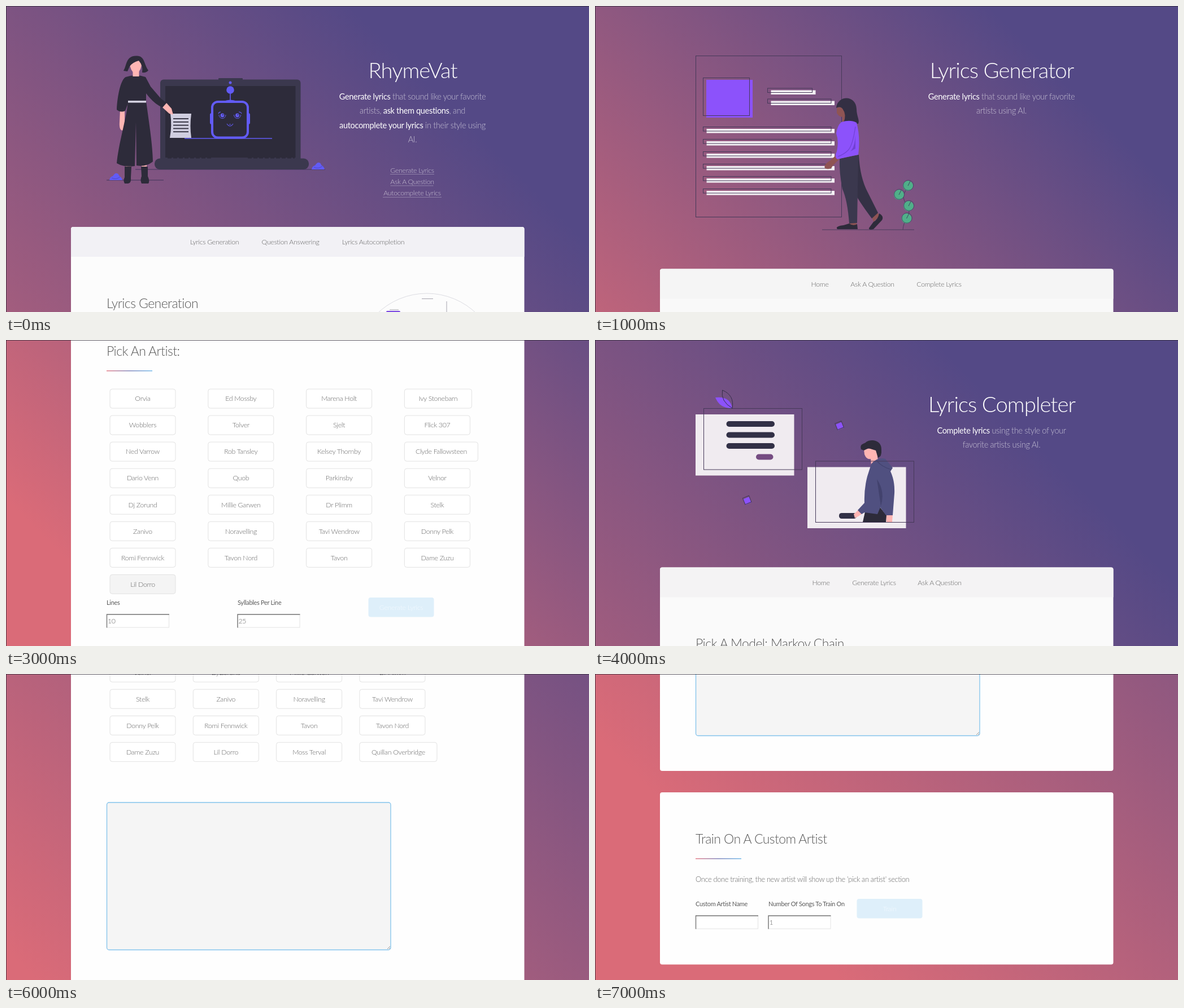
Recreate the animation shown at these times as an HTML page. Size 1032x543 px, loop 8000 ms.

```html
<!DOCTYPE html>
<html lang="en">
<head>
<meta charset="utf-8">
<style>
  html, body { margin: 0; width: 100%; height: 100%; overflow: hidden; }
  svg { display: block; width: 1032px; height: 543px; font-family: Lato, "Open Sans", sans-serif; }
  text { letter-spacing: -.025em; }
  .card { fill: var(--card); }
  .thin { fill: none; stroke: #463959; }
</style>
</head>
<body>
<svg id="stage" viewBox="0 0 1032 543"></svg>
<script>
const DARK = '#2d2b3a', SLATE = '#3b384e', BLUE = '#625bf6', VIOLET = '#8c52fb', SKIN = '#ffb5b3', BROWN = '#8f5454';
const GREY = '#646464', SOFT = 'rgba(255,255,255,.65)';

const rect = (x, y, w, h, fill, r = 0, more = '') =>
  `<rect x="${x}" y="${y}" width="${w}" height="${h}" rx="${r}" fill="${fill}" ${more}/>`;
const frame = (x, y, w, h) => `<rect class="thin" x="${x}" y="${y}" width="${w}" height="${h}"/>`;
const circle = (x, y, r, fill, more = '') => `<circle cx="${x}" cy="${y}" r="${r}" fill="${fill}" ${more}/>`;
const shape = (d, fill) => `<path d="${d}" fill="${fill}"/>`;
const line = (d, stroke, w = 1, more = '') => `<path d="${d}" fill="none" stroke="${stroke}" stroke-width="${w}" ${more}/>`;
const text = (x, y, s, size, fill = GREY, anchor = 'start', weight = 300) =>
  `<text x="${x}" y="${y}" font-size="${size}" fill="${fill}" text-anchor="${anchor}" font-weight="${weight}">${s}</text>`;
const strong = s => `<tspan font-weight="400" fill="#fff">${s}</tspan>`;
const at = (y, body) => `<g transform="translate(0 ${y})">${body}</g>`;
const repeat = (n, draw) => Array.from({ length: n }, (_, i) => draw(i)).join('');

// Diagonal page backdrop, pink at bottom left and purple at top right
function backdrop(id, h) {
  const inset = .15 * (1032 + h), a = (1032 - inset) / 2, b = (inset - h) / 2;
  return `<linearGradient id="${id}" gradientUnits="userSpaceOnUse" x1="${a}" y1="${-a}" x2="${b}" y2="${-b}">
    <stop stop-color="#544986"/><stop offset="1" stop-color="#da6b78"/></linearGradient>` + rect(0, 0, 1032, h, `url(#${id})`);
}
const card = (y, h) => `<rect class="card" x="115" y="${y}" width="802.5" height="${h}" rx="4"/>`;
const nav = (y, items, fill) =>
  shape(`M115 ${y + 53}v-49q0-4 4-4h794.5q4 0 4 4v49z`, fill) +
  items.map(([x, s]) => text(x, y + 31, s, 12.3, GREY, 'middle')).join('');
const intro = (title, lines) => text(720, 128, title, 38.3, '#fff', 'middle') +
  lines.map((s, i) => text(719.5, 165.5 + i * 25.5, s, 14.6, SOFT, 'middle')).join('');
const heading = (y, s) => text(178, y, s, 23, '#585858') + rect(178, y + 26, 81, 1.4, 'url(#rule)');
const label = (x, y, s) => text(x, y, s, 10.9, '#595959', 'start', 400);
const input = (x, y, s) => rect(x, y, 110, 23, '#fff', 0, 'stroke="#e4e4e4"') +
  line(`M${x} ${y + 23.5}V${y}h110.5`, '#777', 1.4) + text(x + 1.5, y + 16, s, 12.3);
const action = (x, y, s, fill, ink = '#fff') =>
  rect(x, y, 116, 34.5, fill, 4) + text(x + 58, y + 21.5, s, 12.3, ink, 'middle');

const wide = { 'Ivy Stonebarn': 119, 'Clyde Fallowsteen': 130, 'Quillan Overbridge': 137 };
function artists(names, top, picked, column) {
  let x = 184;
  return names.split(',').map((name, i) => {
    if (i % 4 == 0) x = 184;
    const w = wide[name] || 116, left = column ? 184 + i % 4 * column : x, y = top + (i >> 2) * 47.05;
    x += w + 31.3;
    return rect(left, y, w, 34, name == picked ? '#f4f4f4' : '#fff', 4, 'stroke="#e2e2e2"') +
      text(left + w / 2, y + 21.3, name, 12.3, GREY, 'middle');
  }).join('');
}

function assistant() {
  const hill = (x, y) => shape(`M${x} ${y}q1-6 6-7q4-6 7-5q3 0 4 4q5 3 6 8z`, BLUE) +
    line(`M${x + 4} ${y - 4}q8 4 15-2`, '#4b45bd', .8);
  const eye = x => line(`M${x - 6} 193a6 6.500 0 0 0 12 0`, BLUE, 1) + circle(x, 194, 3.4, BLUE) + circle(x + 1, 193, .9, DARK);
  return line('M229 290H565M178 309H279', '#40355a', 1.2) + hill(183, 309) + hill(541, 290) +
    rect(376, 128, 43, 6, SLATE, 1) + rect(273, 130.5, 248.5, 150, SLATE, 6) + rect(282, 142, 230.5, 127, DARK) +
    line('M286 269H366M428 269H511', DARK, 4, 'stroke-dasharray="7 3"') + rect(263, 270.5, 273, 19.5, SLATE, 9) +
    circle(397, 136, 2.5, BLUE) + circle(397, 149, 6.8, BLUE) + line('M397 154V168', BLUE, 1.6) +
    shape('M385 169q12-5 24 0z', BLUE) + rect(361, 190, 6, 20, BLUE, 3) + rect(426, 190, 6, 20, BLUE, 3) +
    rect(365, 170, 63, 63.5, DARK, 10, `stroke="${BLUE}" stroke-width="4"`) + eye(383) + eye(409.5) +
    line('M376 191q1-3 4-3M412 188q4 0 5 3M391 209q5.500 8 11 0M395 210h3', BLUE, 1.2) +
    line('M316 235H471', BLUE, 1.4) +
    shape('M291 191H328Q325 213 328 234H290Q294 213 291 191z', '#d0cee0') +
    repeat(5, i => line(`M296 ${200 + i * 5.8}h27`, DARK, 1.8)) +
    rect(212, 278, 9, 9, SKIN) + rect(240, 278, 9, 9, SKIN) +
    shape('M210 285h12l-1 19q1 11-5 11h-6q-3-5 0-11zM239 285h12v17q4 9 1 13h-12q-3-6 0-13z', DARK) +
    shape('M202 184h8v21q1 14-4 16q-6-1-5-15z', SKIN) + shape('M284 172l9 10 3 11-7-2-12-11z', SKIN) +
    shape('M216 170C213 200 199 245 196 279Q210 287 228 284L230 206 231 283Q248 286 260 276C259 240 252 200 248 168z', DARK) +
    shape('M212 126Q230 120 247 126L256 143 274 164 284 172 277 180Q262 174 248 155V173H216L211 186Q203 190 196 184C197 160 203 130 212 126z', DARK) +
    rect(216, 168, 32, 3.6, '#d2d0df') + rect(224.5, 114, 11, 11, SKIN) +
    shape('M219 100Q229 92 240 100Q241 113 230 122Q219 115 219 100z', SKIN) +
    shape('M208 115C214 105 212 89 230 88.500C246 87 244 104 252 114Q249 119 241 118Q243 106 235 97Q224 100 219 107L215 116z', DARK);
}

function writer() {
  const bar = (x, y, w) => rect(x, y, w, 7.5, '#f3f0f4') + frame(x - 6, y - 3.5, w, 7.5);
  const leaf = (x, y) => circle(x, y, 9, '#50af89') + circle(x + .7, y - .8, 9, 'none', 'stroke="#3d4460" stroke-width=".8"') +
    line(`M${x} ${y}l4-8`, '#3d4460');
  return frame(178.5, 88.5, 258, 286) + rect(197, 131, 82, 67, VIOLET) + frame(191.5, 127.5, 82, 67) +
    bar(311.5, 149.5, 79) + bar(311.5, 168.5, 112.5) + repeat(6, i => bar(197.5, 218 + i * 22, 226.5)) +
    line('M402 397H565', '#4b3d5d') + line('M545 397q1-12 7-20q6-10 3-22q-10-8-9-20l8-16', '#4b3d5d') +
    leaf(554, 319) + leaf(538, 335) + leaf(555, 355) + leaf(551.5, 377) +
    shape('M428 180v10q4 7 10 7v13l15-3-12-28zM489 371l10-6 5 7-11 11zM450 383h13v9h-14z', BROWN) +
    shape('M450 268l17-4q2 41 16 67l18 36-11 10Q466 345 456 325z', '#343145') +
    shape('M433 271l33-7-2 121-14 1Q447 345 438 325Q432 295 433 271z', SLATE) +
    shape('M450 386q7 5 14 1l1 9H429q-5-5 11-7zM503 368q9 5 5 12l-15 16q-9 2-8-2l8-11q8-4 10-15z', DARK) +
    shape('M427 181C429 158 462 157 463 183C463 195 469 203 466 209L440 207Q446 193 438 182Q434 177 427 181z', '#332f43') +
    shape('M427 264l-10 10q-13 7-10 14q10 4 14-5l12-12z', BROWN) +
    shape('M436 206Q452 201 463 207Q470 232 466 264Q445 268 429 272Q423 268 428 258Q432 240 427 226Q429 212 436 206z', VIOLET) +
    line('M461 214Q456 248 448 256T430 267', '#7141d3', 1.2) + shape('M461 229q-1 22-9 29l9-5z', '#7141d3');
}

function chatter() {
  const chip = (x, y) => `<g transform="translate(${x} ${y}) rotate(-22)">${rect(-5.5, -5, 11, 11, VIOLET)}${frame(-6, -7, 12, 12)}</g>`;
  const panel = (x, y) => rect(x, y, 174.5, 108.5, '#f0ebf0') + frame(x + 14.5, y - 10.5, 174, 108.5);
  return panel(178, 132) + shape('M213 102Q239 99 243 121Q221 122 213 102z', VIOLET) +
    line('M225.5 89Q222 109 243 121Q247 98 225.5 89z', '#352f49') +
    repeat(3, i => rect(232.5, 144 + i * 19.5, 85.5, 10, '#323046', 5)) + rect(285, 202.5, 30.5, 10, '#754c82', 5) +
    chip(433, 152.5) + chip(269.5, 285) + rect(376, 225.5, 174.5, 108.5, '#f0ebf0') +
    rect(432, 307, 31, 10, '#323046', 4.5) +
    shape('M476 194l1 9q4 10 11 8l1 12 12-8-3-24zM467 301l-9 8 2 7 6-3 7-5zM515 309h12l-1 14h-10z', SKIN) +
    shape('M478 305h23l2-10 13 16-1 12h-41z', DARK) +
    shape('M489 220Q500 207 514 211L527 227 523 233Q531 250 530 272L527 311H515L505 297 500 309 477 306 472 309 465 302 477 289Q476 265 482 242z', '#505080') +
    line('M500 216q10 10 24 14', '#42426d', 1.1) + shape('M499 247q15 22 7 48z', '#42426d') +
    shape('M471 194C468 183 477 185 480 181C488 175 508 177 507 195Q508 207 501 209L497 196 484 192 476 196z', DARK) +
    frame(390.5, 215, 174, 108.5);
}

function preview() {
  return circle(745, 636, 126, 'none', 'stroke="#dcdce2"') +
    line('M736 519.5H756M780 524V560M679 539H695', '#a5a3ae') + rect(673, 541, 25, 12, '#7b48e0', 2);
}

const pages = {
  home: backdrop('g1', 1784) + assistant() +
    intro('RhymeVat', [strong('Generate lyrics') + ' that sound like your favorite',
      'artists, ' + strong('ask them questions') + ', and',
      strong('autocomplete your lyrics') + ' in their style using', 'AI.']) +
    [['Generate Lyrics', 77], ['Ask A Question', 76], ['Autocomplete Lyrics', 103]].map(([s, w], i) =>
      text(719, 295.5 + i * 20.4, s, 12.3, SOFT, 'middle') +
      line(`M${719 - w / 2} ${298.5 + i * 20.4}h${w}`, 'rgba(255,255,255,.6)', 1, 'stroke-dasharray="1 1"')).join('') +
    card(392, 1300) + nav(392, [[369, 'Lyrics Generation'], [503.5, 'Question Answering'], [650, 'Lyrics Autocompletion']], '#f2f1f5') +
    heading(536, 'Lyrics Generation') + preview(),

  generator: backdrop('g2', 1200) + writer() +
    intro('Lyrics Generator', [strong('Generate lyrics') + ' that sound like your favorite', 'artists using AI.']) +
    card(466.5, 760) + nav(466.5, [[398, 'Home'], [491, 'Ask A Question'], [609, 'Complete Lyrics']], '#f5f5f5') +
    at(582, heading(28, 'Pick An Artist:') +
      artists('Orvia,Ed Mossby,Marena Holt,Ivy Stonebarn,Wobblers,Tolver,Sjelt,Flick 307,Ned Varrow,Rob Tansley,Kelsey Thornby,Clyde Fallowsteen,Dario Venn,Quob,Parkinsby,Velnor,Dj Zorund,Millie Garwen,Dr Plimm,Stelk,Zanivo,Noravelling,Tavi Wendrow,Donny Pelk,Romi Fennwick,Tavon Nord,Tavon,Dame Zuzu,Lil Dorro',
        87, 'Lil Dorro', 173.8) +
      label(178, 470, 'Lines') + label(410, 470, 'Syllables Per Line') +
      input(178.5, 487, '10') + input(410, 487, '25') + action(641.5, 457, 'Generate Lyrics', '#deeffa', '#f4faff')),

  completer: backdrop('g3', 1853) + chatter() +
    intro('Lyrics Completer', [strong('Complete lyrics') + ' using the style of your', 'favorite artists using AI.']) +
    card(403.5, 1078.5) + nav(403.5, [[400, 'Home'], [494, 'Generate Lyrics'], [610, 'Ask A Question']], '#f4f3f4') +
    at(518, heading(29, 'Pick A Model: Markov Chain') + action(178, 82, 'Markov Chain', '#82c3ec') +
      heading(145, 'Pick An Artist:') +
      artists('Orvia,Ed Mossby,Marena Holt,Ivy Stonebarn,Wobblers,Tolver,Sjelt,Flick 307,Redbrowe,Ned Varrow,Rob Tansley,Kelsey Thornby,Clyde Fallowsteen,Dario Venn,Quob,Parkinsby,Velnor,Dj Zorund,Millie Garwen,Dr Plimm,Stelk,Zanivo,Noravelling,Tavi Wendrow,Donny Pelk,Romi Fennwick,Tavon,Tavon Nord,Dame Zuzu,Lil Dorro,Moss Terval,Quillan Overbridge',
        204, 'Quob')) +
    at(1310, rect(178.5, -152, 502.5, 261.5, '#f5f5f5', 4, 'stroke="#82c3ec" stroke-width="1.3"') +
      line('M675 108l5-5M678 108l2-2', '#999') +
      card(210, 305.5) + heading(301, 'Train On A Custom Artist') +
      text(178, 369, "Once done training, the new artist will show up the 'pick an artist' section", 12.8) +
      label(178, 412, 'Custom Artist Name') + label(307, 412, 'Number Of Songs To Train On') +
      input(178.5, 429, '') + input(307, 429, '1') + action(463.5, 399, 'Train', '#deeffa', '#f4faff'))
};

const stage = document.getElementById('stage');
stage.innerHTML = `<defs><linearGradient id="rule"><stop stop-color="#e37682"/><stop offset=".5" stop-color="#7a7fb8"/>
  <stop offset="1" stop-color="#6bb5e8"/></linearGradient></defs>` +
  Object.entries(pages).map(([id, body]) => `<g id="${id}">${body}</g>`).join('') +
  line('M0 .5H1032M.5 0V543', '#2c2936', 1, 'opacity=".75"');

// One step per second: page, scroll offset, card colour
const steps = [
  ['home', 0, '#fcfcfc'], ['generator', 0, '#f9f9f9'], ['generator', 582, '#fefefe'], ['generator', 582, '#fefefe'],
  ['completer', 0, '#fafafa'], ['completer', 518, '#fefefe'], ['completer', 930, '#fefefe'], ['completer', 1310, '#fefefe']
];
const start = performance.now();
function draw(now) {
  const [page, scroll, fill] = steps[Math.floor(Math.max(0, now - start) / 1000) % steps.length];
  for (const id in pages) document.getElementById(id).style.display = id == page ? '' : 'none';
  document.getElementById(page).setAttribute('transform', `translate(0 ${-scroll})`);
  stage.style.setProperty('--card', fill);
  requestAnimationFrame(draw);
}
draw(start);
</script>
</body>
</html>
```
